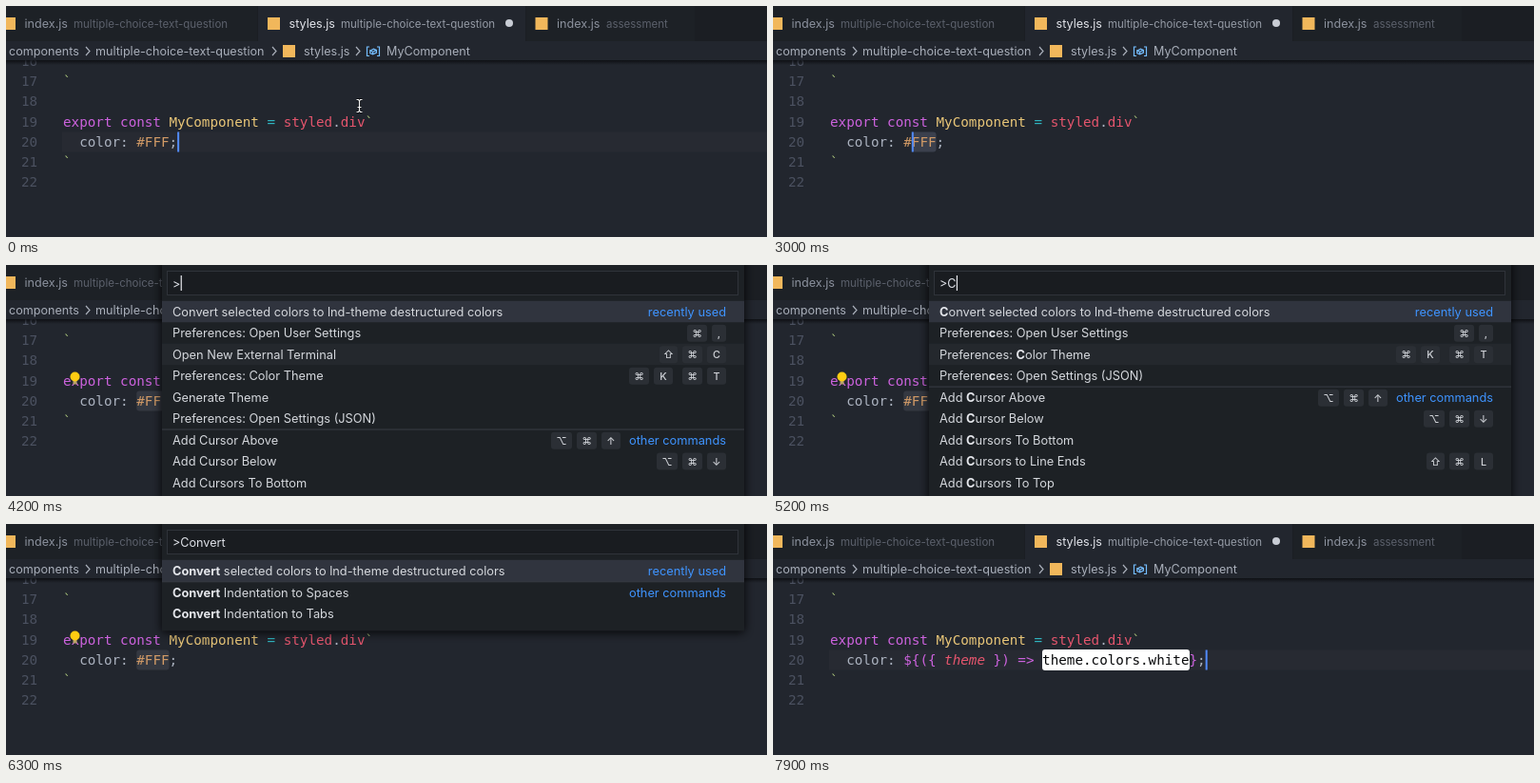
Animation of 800 by 243 pixels, one loop 8 s. Source, as an HTML page with a canvas:

```html
<!DOCTYPE html>
<html lang="en">
<head>
<meta charset="utf-8">
<title>Editor command palette</title>
<style>
  html, body { margin: 0; width: 100%; height: 100%; overflow: hidden; background: #22262e; }
  canvas { display: block; width: 800px; height: 243px; }
</style>
</head>
<body>
<canvas id="stage"></canvas>
<script>
const W = 800, H = 243, LOOP = 8000;
const canvas = document.getElementById('stage');
const ctx = canvas.getContext('2d');
const dpr = window.devicePixelRatio || 1;
canvas.width = W * dpr;
canvas.height = H * dpr;

const UI = 'Inter, "DejaVu Sans", sans-serif';
const MONO = '14.25px "DejaVu Sans Mono", monospace';
const CHAR = 8.58, LEFT = 60;
const ROW = 22.45, ROW_TEXT = 12.8;
const C = {
  bg: '#22262e', bar: '#1b1e23', tab: '#1d2126', line: '#272a32',
  grey: '#abb2bf', purple: '#cc62dd', yellow: '#e9c678', cyan: '#2fb5c0',
  red: '#e5556d', orange: '#d19a66', tick: '#a9c27a', badge: '#f1b75b',
  blue: '#3f94ff', caret: '#528bff', select: '#3b404d', text: '#d5d8dd'
};

// time, caret column, other end of the selection
const edits = [
  [0, 14, 14], [2000, 13, 13], [2500, 12, 13], [2800, 11, 13],
  [3000, 10, 13], [3200, 9, 13], [6500, 9, 45], [7500, 46, 46]
];
// time, text in the palette's input
const typed = [
  [4000, ''], [5100, 'C'], [5300, 'Co'], [5400, 'Conv'],
  [5500, 'Conve'], [5600, 'Conver'], [5700, 'Convert']
];
const PALETTE_END = 6500, REPLACED = 6500;

const convert = ['Convert selected colors to lnd-theme destructured colors'];
const user = ['Preferences: Open User Settings', '⌘ ,'];
const theme = ['Preferences: Color Theme', '⌘ K | ⌘ T'];
const json = ['Preferences: Open Settings (JSON)'];
const above = ['Add Cursor Above', '⌥ ⌘ ↑'];
const below = ['Add Cursor Below', '⌥ ⌘ ↓'];
const bottom = ['Add Cursors To Bottom'];
const spaces = ['Convert Indentation to Spaces'];
const tabs = ['Convert Indentation to Tabs'];

// "other" is the index where the second group begins
function listFor(query) {
  if (!query) return {
    other: 6,
    rows: [convert, user, ['Open New External Terminal', '⇧ ⌘ C'], theme,
      ['Generate Theme'], json, above, below, bottom]
  };
  if (query === 'C') return {
    other: 4,
    rows: [convert, user, theme, json, above, below, bottom,
      ['Add Cursors to Line Ends', '⇧ ⌘ L'], ['Add Cursors To Top']]
  };
  if (query === 'Co') return { other: 2, rows: [convert, theme, spaces, tabs] };
  return { other: 1, rows: [convert, spaces, tabs] };
}

const latest = (list, t) => list.filter(e => e[0] <= t).pop();
const blink = (t, since) => (t - since) % 1000 < 500;
const baseline = n => 126.6 + (n - 19) * 21.25;

function rect(x, y, w, h, color) {
  ctx.fillStyle = color;
  ctx.fillRect(x, y, w, h);
}

function rounded(x, y, w, h, r, color) {
  ctx.fillStyle = color;
  ctx.beginPath();
  ctx.roundRect(x, y, w, h, r);
  ctx.fill();
}

function dot(x, y, r, color) {
  ctx.fillStyle = color;
  ctx.beginPath();
  ctx.arc(x, y, r, 0, Math.PI * 2);
  ctx.fill();
}

function stroke(color, width, ...lines) {
  ctx.strokeStyle = color;
  ctx.lineWidth = width;
  ctx.beginPath();
  for (const p of lines)
    for (let i = 0; i < p.length; i += 2)
      i ? ctx.lineTo(p[i], p[i + 1]) : ctx.moveTo(p[i], p[i + 1]);
  ctx.stroke();
}

// draws a label and returns its right edge
function label(str, x, y, color, size = 12.6, weight = 400) {
  ctx.font = `${weight} ${size}px ${UI}`;
  ctx.fillStyle = color;
  ctx.fillText(str, x, y);
  return x + ctx.measureText(str).width;
}

function labelRight(str, right, y, color) {
  ctx.textAlign = 'right';
  label(str, right, y, color, ROW_TEXT);
  ctx.textAlign = 'left';
}

function code(str, col, line, color, style = '') {
  ctx.font = style + MONO;
  ctx.fillStyle = color;
  ctx.fillText(str, LEFT + col * CHAR, baseline(line));
}

const badge = (x, y) => rect(x, y, 13, 13, C.badge);

function drawTab(x, w, name, nameX, desc, descX, active) {
  rect(x, 0, w, 37, active ? C.bg : C.tab);
  badge(nameX - 22.5, 12);
  label(name, nameX, 23, active ? '#e2e4ea' : '#8b919d');
  label(desc, descX, 23, active ? '#959ba6' : '#5c616c', 11.5);
}

function drawHeader() {
  rect(0, 0, W, 37, C.bar);
  drawTab(0, 264, 'index.js', 19.5, 'multiple-choice-text-question', 71, false);
  drawTab(265, 281, 'styles.js', 297.5, 'multiple-choice-text-question', 352, true);
  drawTab(547, 177, 'index.js', 579, 'assessment', 631, false);
  dot(529, 18, 4, '#c8ccd4');

  rect(0, 37, W, 20, C.bg);
  const grey = '#a9afba';
  label('components', 3, 52, grey);
  label('multiple-choice-text-question', 94, 52, grey);
  badge(291, 41);
  label('styles.js', 313, 52, grey);
  label('MyComponent', 400, 52, grey);
  for (const x of [84, 280, 368]) stroke(grey, 1.2, [x, 43, x + 4, 47.5, x, 52]);
  stroke('#75beff', 1.2,
    [382, 43, 379.5, 43, 379.5, 52.5, 382, 52.5],
    [390, 43, 392.5, 43, 392.5, 52.5, 390, 52.5],
    [382.8, 47, 386.5, 45.2, 389.4, 46.4, 389.4, 49, 385.6, 50.8, 382.8, 49.6, 382.8, 47, 385.6, 48.2, 389.4, 46.4],
    [385.6, 48.2, 385.6, 50.8]);

  const shade = ctx.createLinearGradient(0, 57, 0, 62);
  shade.addColorStop(0, 'rgba(8,9,12,.75)');
  shade.addColorStop(1, 'rgba(8,9,12,0)');
  rect(0, 57, W, 5, shade);
}

function drawBulb() {
  rect(70.5, 121, 4, 4.5, '#b9a36a');
  dot(72.5, 117.5, 5, '#ffcc12');
}

function drawPointer(x, y) {
  const beam = [
    [x - 3, y - 6.5, x - 1, y - 6.5, x, y - 5, x + 1, y - 6.5, x + 3, y - 6.5],
    [x, y - 5, x, y + 5],
    [x - 3, y + 6.5, x - 1, y + 6.5, x, y + 5, x + 1, y + 6.5, x + 3, y + 6.5],
    [x - 2, y + 1.5, x + 2, y + 1.5]
  ];
  stroke('#111318', 3, ...beam);
  stroke('#f2f2f2', 1.2, ...beam);
}

function drawEditor(t, focused) {
  const [since, caret, end] = latest(edits, t);
  const replaced = t >= REPLACED;
  const x = LEFT + caret * CHAR;

  rect(0, 0, W, H, C.bg);
  if (caret === end) rect(59, 132.5, W - 59, 21, C.line);
  else rounded(x, 132.5, (end - caret) * CHAR, 21, 3, focused ? C.select : '#343841');

  for (let n = 16; n <= 22; n++) {
    ctx.font = MONO;
    ctx.fillStyle = '#4b5160';
    ctx.fillText(n, 16, baseline(n));
  }
  code('`', 0, 17, C.tick);
  code('export const', 0, 19, C.purple);
  code('MyComponent', 13, 19, C.yellow);
  code('=', 25, 19, C.cyan);
  code('styled', 27, 19, C.red);
  code('.', 33, 19, C.grey);
  code('div', 34, 19, C.red);
  code('`', 37, 19, C.tick);
  code('color:', 2, 20, C.grey);
  if (replaced) {
    code('${({', 9, 20, C.purple);
    code('theme', 14, 20, C.red, 'italic ');
    code('}) =>', 20, 20, C.purple);
    rounded(283, 132, 155, 22, 3, '#fff');
    code('theme.colors.white', 26, 20, '#08090b');
    code('}', 44, 20, C.purple);
    code(';', 45, 20, C.grey);
  } else {
    code('#FFF', 9, 20, C.orange);
    code(';', 13, 20, C.grey);
  }
  code('`', 0, 21, C.tick);

  if (focused && blink(t, since)) rect(x, 132.5, 2, 21, C.caret);
  if (t >= 3300 && t < 7500) drawBulb();
  if (t < 2000) drawPointer(371.5, 105);
}

const keyWidth = { ',': 15, '⌘': 21, '⇧': 19, '⌥': 22 };

function drawKeys(keys, right, y) {
  ctx.textAlign = 'center';
  for (const k of keys.split(' ').reverse()) {
    if (k === '|') { right -= 5; continue; }
    const w = keyWidth[k] || 20;
    rounded(right - w, y - 9, w, 18, 3, '#2b2f35');
    label(k, right - w / 2, y + 4, '#d0d3d8', 10.8, 500);
    right -= w + 5;
  }
  ctx.textAlign = 'left';
}

function drawMatch(str, query, x, y) {
  let i = str.indexOf(query);
  if (i < 0) i = str.indexOf(query.toLowerCase());
  const end = i + query.length;
  x = label(str.slice(0, i), x, y, C.text, ROW_TEXT);
  x = label(str.slice(i, end), x, y, '#e4e6eb', ROW_TEXT, 700);
  label(str.slice(end), x, y, C.text, ROW_TEXT);
}

function drawPalette(t) {
  const [since, query] = latest(typed, t);
  const { rows, other } = listFor(query);

  ctx.save();
  ctx.shadowColor = 'rgba(0,0,0,.9)';
  ctx.shadowBlur = 10 * dpr;
  ctx.shadowOffsetY = 2 * dpr;
  rect(164, -10, 612, 55 + ROW * rows.length, '#1d2125');
  ctx.restore();

  rect(169, 6, 601, 26, '#2f333a');
  rect(170, 7, 599, 24, '#191c20');
  const caretX = label('>' + query, 175, 24, '#dfe2e8');
  if (blink(t, since)) rect(caretX + 0.3, 11, 1.2, 16, '#e6e8ec');

  rows.forEach(([name, keys], i) => {
    const group = i === other;
    const top = 37.8 + ROW * i;
    const y = top + (group ? 12.2 : 11.6);
    if (i === 0) rect(164, top, 612, ROW, '#30343e');
    if (i === 2 && rows.length > 4) rect(164, top, 612, ROW, '#24282d');
    if (group) rect(164, top, 612, 1, '#3a3e46');
    drawMatch(name, query, 175, y + 4.5);
    if (i === 0) labelRight('recently used', 757, y + 4.5, C.blue);
    if (group) labelRight('other commands', 757, y + 4.5, C.blue);
    if (keys) drawKeys(keys, group ? 646 : 757, y);
  });
}

function frame(now) {
  const t = now % LOOP;
  const open = t >= typed[0][0] && t < PALETTE_END;
  ctx.setTransform(dpr, 0, 0, dpr, 0, 0);
  drawEditor(t, !open);
  drawHeader();
  if (open) drawPalette(t);
}

const start = performance.now();
function tick() {
  frame(performance.now() - start);
  requestAnimationFrame(tick);
}
tick();
</script>
</body>
</html>
```
